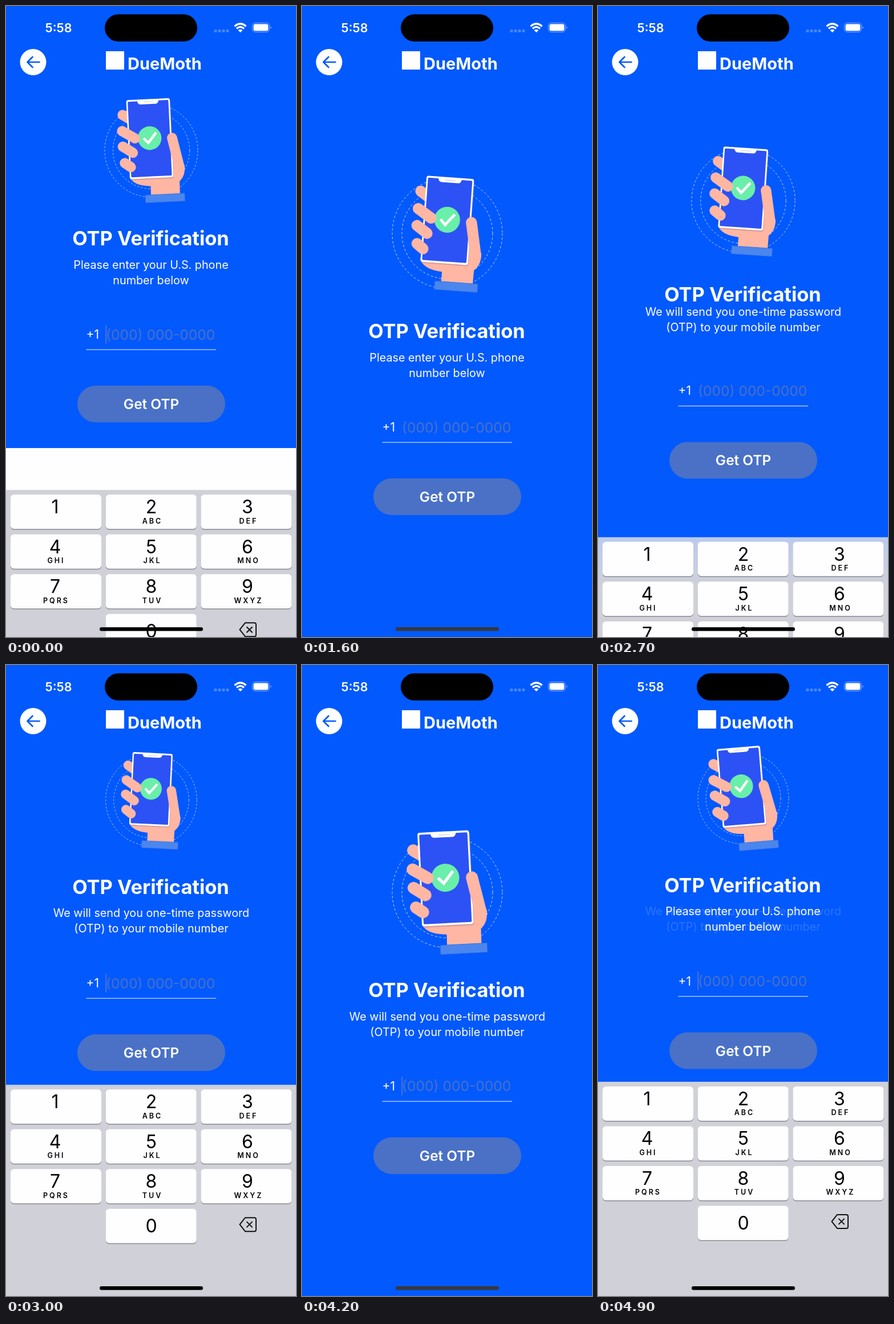
Animation, 508 px wide and 1102 px high, one loop 5000 ms. Source, as an HTML page:

```html
<!DOCTYPE html>
<html lang="en">
<head>
<meta charset="utf-8">
<title>Phone verification</title>
<style>
  html, body { margin: 0; width: 100%; height: 100%; overflow: hidden; background: #fefdff; }
  svg { display: block; width: 100vw; height: 100vh; }
  text { font-family: Inter, "Liberation Sans", sans-serif; fill: #fff; }
  .mid { text-anchor: middle; }
  .sub { font-size: 19.75px; text-anchor: middle; }
  #keyboard text { fill: #000; text-anchor: middle; }
  .digit { font-size: 32px; }
  .letters { font-size: 12.5px; font-weight: 600; letter-spacing: 3px; }
  .skin { stroke: #ffb6a3; stroke-width: 20.5; stroke-linecap: round; }
</style>
</head>
<body>
<svg viewBox="0 0 508 1102" preserveAspectRatio="none">
  <defs>
    <linearGradient id="tint" x2="0" y2="1">
      <stop offset="0" stop-color="#a9c4ff" stop-opacity=".55"/>
      <stop offset="1" stop-color="#a9c4ff" stop-opacity="0"/>
    </linearGradient>
  </defs>
  <rect width="508" height="1102" fill="#fefdff"/>
  <rect id="panel" width="508" height="1102" fill="#0259fe"/>

  <g id="art">
    <g fill="none" stroke="#fff" stroke-opacity=".75" stroke-dasharray="4 3.5">
      <circle cx="254.5" cy="397" r="96.5"/>
      <circle cx="254.5" cy="397" r="79.5"/>
    </g>
    <g id="hand">
      <path class="skin" d="M198.5 323.5L222 338"/>
      <path fill="#ffb6a3" d="M209 450C215 463 230 468 251 469V489H310V461C318 454 322 444 321 430L300 380H215Z"/>
      <g transform="rotate(-.9 252.3 373)">
        <rect x="209" y="296" width="88.5" height="159.5" rx="4" fill="#b98a92" fill-opacity=".5"/>
        <rect x="208" y="293" width="88.5" height="160" rx="4" fill="#fff"/>
        <rect x="211" y="296.5" width="82.5" height="153" rx="2" fill="#2c52f5"/>
        <path fill="#fff" d="M229 294H275C273 296 274 303 267 303H237C230 303 231 296 229 294Z"/>
        <path stroke="#c8ccd8" d="M243 298.5H263"/>
      </g>
      <circle cx="252" cy="372" r="24" fill="#69efa9"/>
      <path d="M239.5 372L249 381.5L265.5 361" fill="none" stroke="#fff" stroke-width="5.2"/>
      <path class="skin" d="M297.5 373L311 434"/>
      <path class="skin" d="M196.5 356L222 371.5M197 387.5L217 400.5M200 421L212 429.5"/>
      <rect x="239.5" y="486.5" width="80" height="15.5" fill="#4b86ee" stroke="#3670e0" transform="rotate(-.9 279.5 494)"/>
    </g>
  </g>

  <g id="form">
    <text class="mid" x="253.5" y="580" font-size="34.4" font-weight="700">OTP Verification</text>
    <text x="140.5" y="743" font-size="21">+1</text>
    <rect id="caret" x="174" y="719" width="2.5" height="33" rx="1" fill="#3c6fe2"/>
    <text x="175" y="744.5" font-size="24.6" style="fill:#4a71c4">(000) 000-0000</text>
    <rect x="140.5" y="761.5" width="227.5" height="1.2" fill="#fff" fill-opacity=".8"/>
    <rect x="125" y="825" width="259" height="64" rx="32" fill="#4a71c6"/>
    <text class="mid" x="254.5" y="866" font-size="24.4" font-weight="600">Get OTP</text>
  </g>
  <g id="subtitle">
    <g id="enter">
      <text class="sub" x="254" y="621">Please enter your U.S. phone</text>
      <text class="sub" x="254" y="648">number below</text>
    </g>
    <g id="send">
      <text class="sub" x="254.5" y="621">We will send you one-time password</text>
      <text class="sub" x="254.5" y="648">(OTP) to your mobile number</text>
    </g>
  </g>

  <g id="header">
    <text x="68.5" y="45.5" font-size="21.5" font-weight="600">5:58</text>
    <rect x="173" y="14.5" width="162" height="47.5" rx="23.75"/>
    <g fill="#fff" fill-opacity=".28">
      <rect x="364.5" y="41" width="5" height="5" rx="1.5"/>
      <rect x="371.5" y="41" width="5" height="5" rx="1.5"/>
      <rect x="378.5" y="41" width="5" height="5" rx="1.5"/>
      <rect x="385.5" y="41" width="5" height="5" rx="1.5"/>
    </g>
    <g fill="none" stroke="#fff" stroke-width="3.3">
      <path d="M400.5 35.5Q410.5 26.5 420.5 35.5M404 39.5Q410.5 33.5 417 39.5"/>
      <path fill="#fff" stroke="none" d="M406.5 42.3Q410.5 39 414.5 42.3L410.5 46.3Z"/>
    </g>
    <rect x="431.5" y="29.5" width="30" height="16" rx="5" fill="none" stroke="#fff" stroke-opacity=".5"/>
    <rect x="433.5" y="31.5" width="26" height="12" rx="3.2" fill="#fff"/>
    <path d="M463.5 35Q466 37.5 463.5 40Z" fill="#fff" fill-opacity=".55"/>
    <circle cx="47.5" cy="98" r="23" fill="#fff"/>
    <path d="M58.5 98H37.5M46.5 89L37.5 98L46.5 107" fill="none" stroke="#0259fe" stroke-width="2.7" stroke-linecap="round" stroke-linejoin="round"/>
    <rect x="175" y="79" width="32" height="32" fill="#fff"/>
    <text x="213" y="111" font-size="29" font-weight="700">DueMoth</text>
  </g>

  <g id="keyboard">
    <rect width="508" height="400" fill="#d0d1d8"/>
    <rect id="glow" width="508" fill="url(#tint)"/>
    <g id="keys"></g>
    <g fill="none" stroke="#111" stroke-width="2" stroke-linejoin="round" stroke-linecap="round">
      <path d="M419 232H435Q438 232 438 235V253Q438 256 435 256H419L409.5 244Z"/>
      <path d="M422 239.5L431 248.5M431 239.5L422 248.5"/>
    </g>
  </g>
  <rect id="home" x="164" y="1085" width="181" height="6.5" rx="3.25"/>
</svg>
<script>
const LOOP = 5000, H = 1102, KEYBOARD_H = 375;
const $ = id => document.getElementById(id);
const clamp = v => Math.max(0, Math.min(1, v));
const shift = (id, y) => $(id).setAttribute('transform', `translate(0 ${y})`);

const LETTERS = ['', 'ABC', 'DEF', 'GHI', 'JKL', 'MNO', 'PQRS', 'TUV', 'WXYZ'];

function key(col, row, digit, letters, digitY) {
  const x = 8 + col * 166.7, y = 8 + row * 69.5, mid = 86 + col * 168.5;
  return `<rect x="${x}" y="${y + 1.5}" width="159" height="60" rx="6" fill="#898a8f"/>
    <rect x="${x}" y="${y}" width="159" height="60" rx="6" fill="#fefdff"/>
    <text class="digit" x="${mid}" y="${y + digitY}">${digit}</text>
    <text class="letters" x="${mid + 2}" y="${y + 50.5}">${letters}</text>`;
}
$('keys').innerHTML = LETTERS.map((s, i) => key(i % 3, Math.floor(i / 3), i + 1, s, 33)).join('')
  + key(1, 3, 0, '', 41.5);

// Critically damped spring from 0 to 1
function spring(ms, rate) {
  const x = Math.max(0, ms) * rate / 1000;
  return 1 - (1 + x) * Math.exp(-x);
}

const MOVES = [[-66, false], [2596.5, true], [3512, false], [4350, true], [4934, false]];

// Keyboard, form and subtitle progress: 0 closed, 1 open
function progress(t) {
  const [start, opens] = MOVES.filter(m => m[0] <= t).pop();
  const age = t - start;
  if (opens) return [0, 23, 6].map(lag => spring(age - lag, 15));
  const form = .88 * (1 - spring(age - 110, 22));
  return [1 - spring(age, 17), form, form];
}

function draw(t) {
  const [keyboard, form, subtitle] = progress(t);
  const panelEnd = H - KEYBOARD_H * form, keyboardTop = H - KEYBOARD_H * keyboard;
  $('panel').setAttribute('height', panelEnd);
  shift('form', -184 * form);
  shift('subtitle', -184 * subtitle);
  shift('keyboard', keyboardTop);
  $('glow').setAttribute('height', 2 * Math.max(0, panelEnd - keyboardTop));
  $('home').setAttribute('fill', keyboard > .1 ? '#000' : '#38383d');

  $('art').setAttribute('transform',
    `translate(254.5 ${397 - 164.5 * form}) scale(${1 - .176 * form}) translate(-254.5 -397)`);
  const angle = 4.8 * Math.sin((t - 580) / 6000 * 2 * Math.PI) + .9;
  $('hand').setAttribute('transform',
    `translate(254.5 397) rotate(${angle}) scale(${1 - .0115 * angle}) translate(-254.5 -397)`);

  const toSend = clamp((t - 2080) / 360), toEnter = clamp((t - 4600) / 360);
  const fadeIn = p => Math.min(1, p * 1.2);
  $('send').setAttribute('opacity', t < 4600 ? fadeIn(toSend) : 1 - toEnter);
  $('enter').setAttribute('opacity', t < 4600 ? 1 - toSend : fadeIn(toEnter));

  const blink = t % 1000;
  $('caret').setAttribute('opacity', blink < 520 || blink > 850 ? 1 : 0);
}

const began = performance.now();
function tick() {
  draw((performance.now() - began) % LOOP);
  requestAnimationFrame(tick);
}
tick();
</script>
</body>
</html>
```
